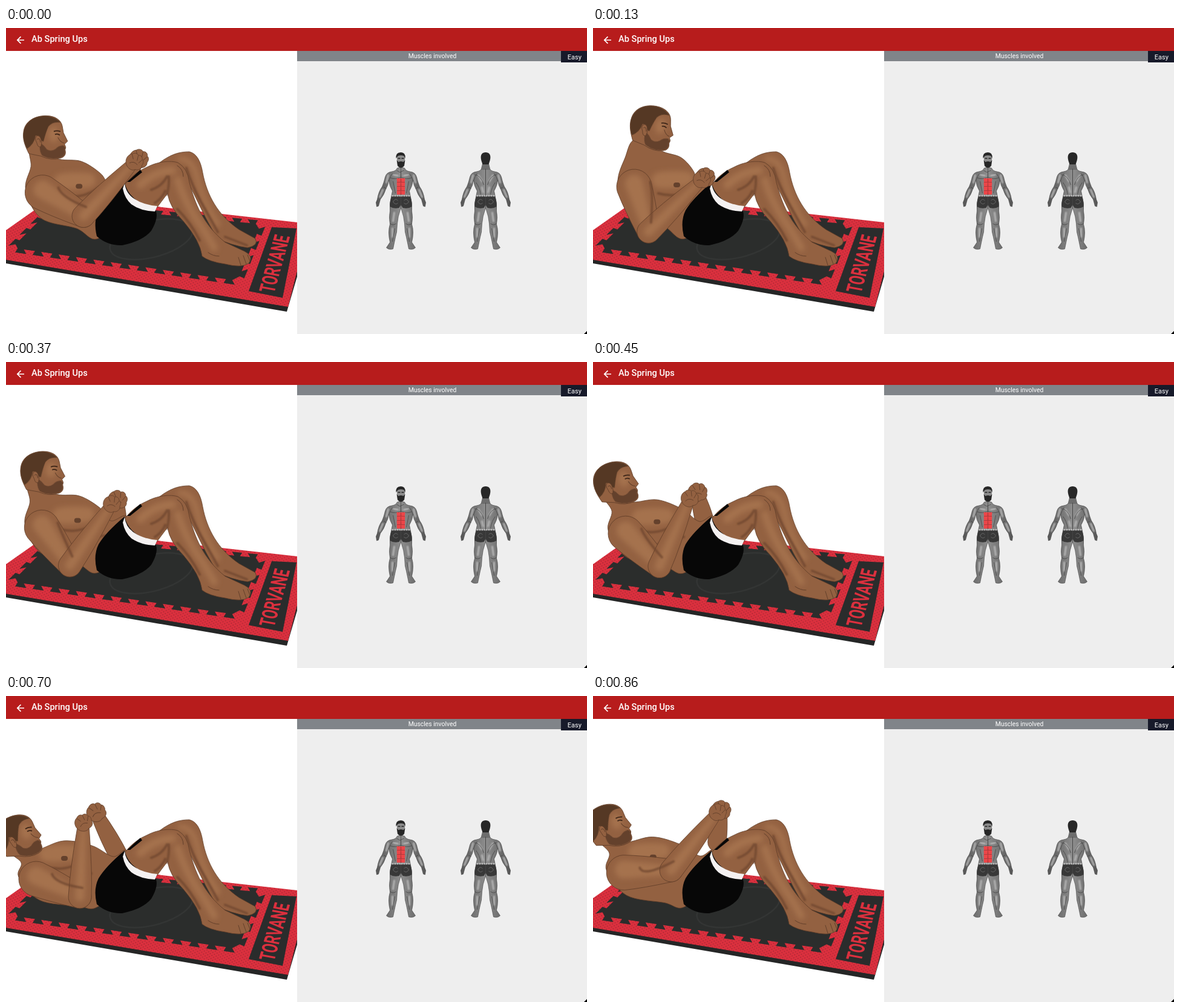
An HTML page that plays this animation: 960 px wide and 507 px high, repeating every 0.93 s.

```html
<!DOCTYPE html>
<html lang="en">
<head>
<meta charset="utf-8">
<title>Ab Spring Ups</title>
<style>
  html, body { margin: 0; width: 100%; height: 100%; overflow: hidden; background: #fff; }
  svg { display: block; width: 960px; height: 507px; }
  text { font-family: Roboto, sans-serif; fill: #fff; }
  .skin { fill: #936141; stroke: #5d3c28; stroke-width: .8; }
  .glow { fill: #a5724e; filter: url(#soft); }
  .sheen { fill: none; stroke: #a5724e; stroke-linecap: round; filter: url(#soft); }
  .dim { fill: none; stroke: #6d452e; stroke-width: 4; stroke-linecap: round; filter: url(#haze); opacity: .7; }
  .line { fill: none; stroke: #63402b; stroke-width: 1; stroke-linecap: round; }
  .hair { fill: #553824; filter: url(#fade); }
  .beard { fill: #64412c; filter: url(#fade); }
  .black { fill: #070707; }
  .hem { fill: #f4f1f1; }
  .grey { fill: url(#steel); stroke: #3c3c3c; stroke-width: .6; }
  .vein { fill: none; stroke: #3f3f3f; stroke-width: .9; opacity: .8; }
  .shine { fill: none; stroke: #b4b4b4; stroke-width: 3; stroke-linecap: round; filter: url(#haze); }
</style>
</head>
<body>
<svg viewBox="0 0 960 507">
  <defs>
    <filter id="soft" x="-50%" y="-50%" width="200%" height="200%"><feGaussianBlur stdDeviation="4"/></filter>
    <filter id="haze" x="-50%" y="-50%" width="200%" height="200%"><feGaussianBlur stdDeviation="1.2"/></filter>
    <filter id="fade"><feGaussianBlur stdDeviation=".7"/></filter>
    <linearGradient id="steel" x1="0" x2="1"><stop stop-color="#8e8e8e"/><stop offset="1" stop-color="#565656"/></linearGradient>
    <pattern id="dots" width="7" height="5" patternUnits="userSpaceOnUse" patternTransform="matrix(1 .17 -.3 1 0 0)">
      <rect width="7" height="5" fill="#db303e"/><circle cx="2" cy="1.5" r=".9" fill="#a92633"/><circle cx="5.5" cy="4" r=".9" fill="#a92633"/>
    </pattern>
    <clipPath id="inTorso"><path id="torsoClip"/></clipPath>
    <g id="fist">
      <path class="skin" d="M-15 4C-18 -4 -14 -13 -7 -15C-3 -19 3 -18 5 -15C10 -17 14 -13 14 -9C18 -7 18 -1 16 2C18 8 12 14 5 13C0 18 -12 14 -15 4Z"/>
      <path class="line" d="M-7 -14L-3 -6M5 -14L5 -5M14 -8L9 -1M-8 3Q-1 -3 7 3"/>
    </g>
    <g id="half">
      <path class="grey" d="M0 25L6 26Q8 31 15 32Q24 33 26 41Q28 50 31 57Q37 65 39 78L41 83L40 90L37 89L34 78Q28 71 25 61Q21 55 20 46Q19 56 14 64L16 74Q19 86 18 97Q20 108 18 119Q22 132 18 149L24 158Q20 162 13 160L11 150Q9 140 7 132L6 118Q5 106 1 95L0 93Z"/>
      <path class="shine" d="M21 38L24 50M30 62L35 74M11 100L13 114M14 126L14 140"/>
      <path class="vein" d="M20 47Q18 40 14 35M24 60L28 58M8 118Q13 122 18 118M10 126L14 148"/>
      <path d="M0 72H15Q19 82 18 90Q12 94 3 92L0 87Z" fill="#383838"/>
      <path d="M5 80Q9 75 13 82Q9 88 5 84" fill="none" stroke="#686868"/>
      <path d="M0 72H15" stroke="#bbb" stroke-width="2.4" stroke-dasharray="3 1"/>
    </g>
    <g id="body"><use href="#half"/><use href="#half" transform="scale(-1 1)"/></g>
  </defs>

  <path fill="#252626" d="M0 383L466 460L481 400V412L464 470L0 390Z"/>
  <path fill="url(#dots)" d="M0 335L82 277L481 322V403L466 462L0 384Z"/>
  <path id="mat" fill="#2b2d2c"/>
  <g fill="none" stroke="#3c3e3d" stroke-width="2.5" opacity=".5">
    <ellipse cx="240" cy="350" rx="70" ry="30" transform="rotate(-14 240 350)"/>
  </g>
  <path fill="#2a2c2c" d="M439 330L480 332L457 447L401 436Z"/>
  <text transform="matrix(.163 -.585 .98 .18 443 440)" font-size="36" font-weight="700" style="fill:#db303e">TORVANE</text>

  <g id="rear"></g>
  <g id="trunk"></g>
  <g id="shade" clip-path="url(#inTorso)"></g>
  <g id="front"></g>
  <g id="head">
    <path class="skin" d="M0 -37C15 -37 25 -30 27 -20L29 -9L36 5L31 10L33 15L32 19Q35 30 25 33Q9 38 -8 30L-28 26C-34 14 -39 2 -37 -10C-35 -28 -18 -37 0 -37Z"/>
    <ellipse class="glow" cx="13" cy="-6" rx="9" ry="13"/>
    <path class="beard" d="M-9 8Q-3 12 2 19Q9 23 16 18Q21 12 29 12L32 15L31 19Q34 29 25 32Q9 37 -6 29Q-12 20 -9 8Z"/>
    <path class="hair" d="M-31 18C-39 4 -40 -14 -29 -26C-15 -40 12 -40 24 -26Q11 -28 4 -19Q0 -10 -4 6L-8 4Q-10 -4 -17 -4Q-19 10 -31 18Z"/>
    <path class="skin" d="M-7 8Q-8 -4 -14 -4Q-20 -1 -15 8Q-13 17 -8 14Z"/>
    <path class="line" d="M-9 7Q-10 -1 -14 2M20 -1Q24 7 30 8M21 17Q26 15 32 17"/>
    <path d="M13 -11Q18 -13 24 -11M15 -6Q19 -8 23 -5" fill="none" stroke="#3b2417" stroke-width="1.8"/>
  </g>
  <g id="arm"></g>

  <rect x="481" y="38" width="479" height="469" fill="#eee"/>
  <rect x="481" y="38" width="479" height="17" fill="#808489"/>
  <rect x="917" y="38" width="43" height="19" fill="#171a2a"/>
  <rect width="960" height="38" fill="#b71c1c"/>
  <path d="M30 20H19M24.5 14.3L18.8 20L24.5 25.7" fill="none" stroke="#fff" stroke-width="1.7"/>
  <text x="42" y="22.5" font-size="14.6" font-weight="500">Ab Spring Ups</text>
  <text x="704.5" y="50.3" font-size="10.4" text-anchor="middle">Muscles involved</text>
  <text x="939.3" y="51.8" font-size="11" text-anchor="middle">Easy</text>
  <path d="M960 502V507H955Z"/>

  <g transform="translate(652.5 206)">
    <use href="#body"/>
    <path d="M-7 5Q0 -2 7 5L6 22Q0 28 -6 22Z" fill="#8c8c8c"/>
    <path d="M-8 10Q-9 0 0 0Q8 0 7 10L5 6Q0 4 -5 6ZM-7 13L-4 16Q0 14 4 16L7 13L5 23Q0 28 -5 23Z" fill="#262626"/>
    <path d="M-5 10H-1M1 10H5" stroke="#222" stroke-width="1.5"/>
    <path class="shine" d="M-12 37L-5 39M12 37L5 39"/>
    <path class="vein" d="M0 32V42M-18 42Q-9 46 0 41Q9 46 18 42M-13 48L-9 68M13 48L9 68M-7 30L-2 33L5 30"/>
    <rect x="-6.5" y="43" width="13" height="27" rx="3" fill="#b03a3c"/>
    <g id="abs" fill="#ec4649"></g>
  </g>
  <g transform="translate(792.5 206)">
    <use href="#body"/>
    <path d="M-5 17H5L8 29H-8Z" fill="#6d6d6d"/>
    <path d="M-7 14C-10 3 -5 0 0 0S10 3 7 14L5 20H-5Z" fill="#272727"/>
    <path class="shine" d="M-12 38L-6 48M12 38L6 48M-6 58L-4 66M6 58L4 66"/>
    <path class="vein" d="M0 27V72M-18 37Q-8 38 -3 54M18 37Q8 38 3 54M-16 50Q-10 57 -8 70M16 50Q10 57 8 70"/>
  </g>
</svg>

<script>
const LOOP = 930;
const changes = [0, 70, 130, 170, 220, 300, 370, 450, 530, 600, 700, 780, 860];

// Two values drive the whole pose, one entry for every second change.
const lift = [.76, 1, .95, .72, .22, 0, .26];
const reach = [.7, 0, 0, .15, .08, 0, 1];

// Where each point is when lying back and when sitting up.
const torsoPath = [
  [[3, 256], [70, 185]],     // nape
  [[25, 276], [53, 215]],
  [[21, 300], [41, 258]],    // shoulder
  [[55, 338], [60, 308]],
  [[118, 348], [115, 327]],  // loin
  [[152, 349], [152, 349]],
  [[200, 300], [200, 300]],
  [[199, 256], [199, 256]],  // waist
  [[177, 266], [170, 262]],
  [[142, 248], [167, 239]],  // chest
  [[95, 240], [146, 215]],
  [[48, 256], [116, 205]]    // throat
];
const headPath = [[22, 234], [98, 166]];
const jointPath = [[50, 303], [68, 263]];
const nipplePath = [[96, 269], [138, 260]];

const $ = id => document.getElementById(id);
const mix = (a, b, f) => a + (b - a) * f;
const shift = (p, x, y) => [p[0] + x, p[1] + y];
const line = ([a, b], u) => a.map((v, i) => mix(v, b[i], u));
// Rising parts swing forward on an arc.
const arc = ([a, b], u) => [mix(a[0], b[0], u * u), mix(a[1], b[1], u)];

function sample(list, k) {
  const i = Math.floor(k);
  return mix(list[i], list[Math.min(i + 1, list.length - 1)], k - i);
}

function add(parent, cls, d = '', width) {
  const el = document.createElementNS('http://www.w3.org/2000/svg', 'path');
  el.setAttribute('class', cls);
  el.setAttribute('d', d);
  if (width) el.setAttribute('stroke-width', width);
  return $(parent).appendChild(el);
}

// Closed Catmull-Rom curve through the points.
function curve(p) {
  const n = p.length, at = i => p[(i + n) % n];
  let d = `M${p[0]}`;
  for (let i = 0; i < n; i++) {
    const [a, b, c, e] = [at(i - 1), at(i), at(i + 1), at(i + 2)];
    d += `C${b.map((v, j) => v + (c[j] - a[j]) / 6)} ${c.map((v, j) => v - (e[j] - b[j]) / 6)} ${c}`;
  }
  return d + 'Z';
}

// Tapered limb with round ends and swelling sides.
function limb(a, b, r, s, swell = 3) {
  const turn = Math.atan2(b[1] - a[1], b[0] - a[0]) + Math.PI / 2;
  const off = (x, y, k) => [x + Math.cos(turn) * k, y + Math.sin(turn) * k];
  const mx = mix(a[0], b[0], .4), my = mix(a[1], b[1], .4), w = mix(r, s, .4) + swell;
  return `M${off(...a, r)}Q${off(mx, my, w)} ${off(...b, s)}A${s} ${s} 0 0 0 ${off(...b, -s)}` +
    `Q${off(mx, my, -w)} ${off(...a, -r)}A${r} ${r} 0 0 0 ${off(...a, r)}Z`;
}

// Elbow below the line from joint to hand, by the two bone lengths.
function bend(a, b, upper = 78, lower = 122) {
  const dx = b[0] - a[0], dy = b[1] - a[1], d = Math.hypot(dx, dy);
  const along = (upper ** 2 - lower ** 2 + d * d) / (2 * d);
  const drop = Math.sqrt(Math.max(0, upper ** 2 - along ** 2));
  return shift(a, (dx * along - dy * drop) / d, (dy * along + dx * drop) / d);
}

// Inner mat field with dovetail teeth on every side.
function matField() {
  const corners = [[82, 292], [421, 325], [383, 419], [10, 364]];
  const pts = [];
  corners.forEach((a, side) => {
    const b = corners[(side + 1) % 4];
    const n = side % 2 ? 4 : 13;
    const out = side % 2 ? [side === 1 ? 9 : -9, 0] : [0, side ? 7 : -6];
    for (let i = 0; i < n; i++)
      for (const [t, k] of [[.32, 0], [.18, 1], [.82, 1], [.68, 0]])
        pts.push(shift(line([a, b], (i + t) / n), out[0] * k, out[1] * k));
  });
  return `M${pts.join('L')}Z`;
}

$('mat').setAttribute('d', matField());
for (let row = 0; row < 4; row++)
  for (const x of [-7, .4])
    add('abs', '', `M${x} ${43 + row * 7}h6.6l-.5 6h-5.6z`);

const farArm = add('rear', 'skin');
add('rear', 'skin', 'M250 226C270 210 285 205 303 205Q320 209 325 240C332 277 350 310 385 334L412 349Q418 360 399 364Q372 360 350 349C325 310 315 280 292 240Z');
add('rear', 'sheen', 'M288 217Q308 217 315 245Q325 287 350 325', 9);
add('rear', 'dim', 'M298 232Q308 264 330 302L350 338M362 346L398 360');

const torso = add('trunk', 'skin');
const glow = add('shade', 'glow');
const pec = add('shade', 'dim');
const nipple = add('shade', 'beard');

add('front', 'skin', 'M196 260C205 247 220 236 232 231C250 221 272 219 284 223Q300 232 303 256C312 290 325 325 362 355L394 370Q410 378 401 390Q390 398 362 391Q335 387 324 378Q321 353 293 320Q270 297 267 274L246 302L210 292Z');
add('front', 'sheen', 'M222 260Q245 238 275 236', 14);
add('front', 'sheen', 'M284 252Q296 292 325 332L344 364', 12);
add('front', 'dim', 'M269 246Q270 260 266 276M246 290Q258 282 263 270M283 300Q305 322 320 352M240 268Q258 262 266 246');
add('front', 'line', 'M283 228Q293 234 293 246M384 380L388 393M392 377L397 391M399 376L403 386M334 372Q342 378 352 378');
add('front', 'black', 'M196 256Q202 286 246 300Q254 312 240 336Q226 353 192 360Q168 361 150 345Q144 320 153 302Q165 282 196 256Z');
add('front', 'black', 'M200 255L222 235L225 239L205 255Z');
add('front', 'hem', 'M196 257Q198 274 212 283Q227 293 250 295L246 304Q222 303 207 292Q196 282 193 266Z');

const upper = add('arm', 'skin'), upperGlow = add('arm', 'glow');
const fists = [.95, .86].map(size => {
  const el = document.createElementNS('http://www.w3.org/2000/svg', 'use');
  el.setAttribute('href', '#fist');
  $('arm').append(el);
  return (p, lean) => el.setAttribute('transform', `translate(${p}) rotate(${lean}) scale(${size})`);
});
const fore = add('arm', 'skin'), foreGlow = add('arm', 'glow');
const crease = add('arm', 'dim');
$('arm').append($('arm').querySelectorAll('use')[1]);

function pose(k) {
  const set = (el, d) => el.setAttribute('d', d);
  const u = sample(lift, k), r = sample(reach, k);

  const shape = curve(torsoPath.map(p => arc(p, u)));
  const n = arc(nipplePath, u);
  set(torso, shape);
  set($('torsoClip'), shape);
  set(glow, limb(shift(n, -28, -8), shift(n, 16, -10), 13, 12));
  set(pec, `M${shift(n, -30, 14)}Q${shift(n, 4, 24)} ${shift(n, 33, 2)}M${shift(n, -2, 40)}Q${shift(n, 18, 28)} ${shift(n, 45, 25)}`);
  set(nipple, limb(shift(n, -1, 0), shift(n, 2, 0), 4, 4, 0));

  const joint = arc(jointPath, u);
  const hand = shift(line([[128, 211], [179, 252]], u), 64 * r, -28 * r);
  const elbow = bend(joint, hand);
  const spread = (1 - u) * (1 - r);
  const farHand = shift(hand, 6 + 15 * spread, -4 - 13 * spread);
  const farElbow = shift(line([[187, 266], [178, 272]], u), 20 * r, -25 * r);
  const wrist = line([elbow, hand], .92);

  set(farArm, limb(farElbow, farHand, 15, 10));
  set(upper, limb(joint, elbow, 29, 19, 2));
  set(upperGlow, limb(shift(joint, 0, -5), elbow, 15, 8, 0));
  set(fore, limb(elbow, wrist, 19, 10));
  set(foreGlow, limb(elbow, wrist, 8, 4, 1));
  set(crease, `M${shift(joint, 26, -8)}Q${shift(joint, 32, 8)} ${shift(elbow, 4, -15)}`);

  const lean = Math.atan2(hand[1] - elbow[1], hand[0] - elbow[0]) * 180 / Math.PI + 60;
  fists[0](farHand, lean);
  fists[1](hand, lean);
  $('head').setAttribute('transform', `translate(${arc(headPath, u)}) rotate(${mix(-14, 11, u * u)})`);
}

const start = performance.now();
let shown = -1;
function tick() {
  const now = (performance.now() - start) % LOOP;
  const step = changes.findLastIndex(time => time <= now);
  if (step !== shown) pose((shown = step) / 2);
  requestAnimationFrame(tick);
}
tick();
</script>
</body>
</html>
```
